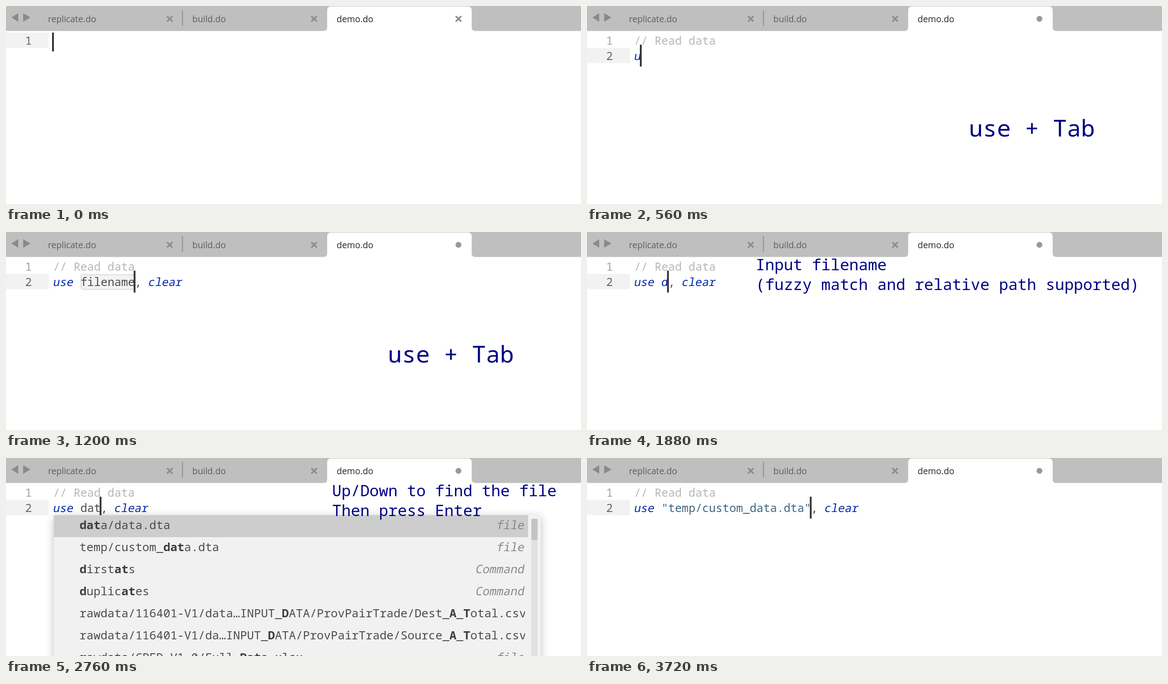
Recreate the animation shown at these times as an HTML page with a canvas. Size 1273 px wide and 440 px high, loop 4200 ms.

```html
<!DOCTYPE html>
<html lang="en">
<head>
<meta charset="utf-8">
<title>Editor file completion</title>
<style>
html, body { margin: 0; width: 100%; height: 100%; overflow: hidden; background: #fff; }
canvas { display: block; }
</style>
</head>
<body>
<canvas id="stage" width="1273" height="440"></canvas>
<script>
const ctx = document.getElementById('stage').getContext('2d');
const LOOP = 4200;
const COMMENT = '// Read data';
const MONO = '"Noto Sans Mono", monospace';
const CODE_ADVANCE = 15.05, LIST_ADVANCE = 15.45;
const CODE_X = 104.5;
const KEYWORD = '#0028ae', PLAIN = '#4c4c4c', STRING = '#3d6684', HINT = '#000085';
const ROW_TOP = 127, ROW_HEIGHT = 48.9;

// Square brackets mark the matched letters.
const SUGGESTIONS = {
  da: [
    ['[da]ta/data.dta', 'file'],
    ['temp/custom_[da]ta.dta', 'file'],
    ['[d]i[a]g', 'Function'],
    ['[d]bet[a]', 'Command'],
    ['[d]isc[a]rd', 'Command'],
    ['[d]irst[a]ts', 'Command'],
    ['[d]ispl[a]y', 'Command']
  ],
  dat: [
    ['[dat]a/data.dta', 'file'],
    ['temp/custom_[dat]a.dta', 'file'],
    ['[d]irst[at]s', 'Command'],
    ['[d]uplic[at]es', 'Command'],
    ['rawdata/116401-V1/data…INPUT_[D]ATA/ProvPairTrade/Dest_[A]_[T]otal.csv', ''],
    ['rawdata/116401-V1/da…INPUT_[D]ATA/ProvPairTrade/Source_[A]_[T]otal.csv', ''],
    ['rawdata/CPED_V1.0/Full_[Dat]a.xlsx', 'file']
  ]
};

const HINTS = {
  tab: { x: 845.5, y: 290, advance: 31, lines: ['use + Tab'] },
  name: { x: 373.5, y: 85, advance: 20.72,
    lines: ['Input filename', '(fuzzy match and relative path supported)'] },
  pick: { x: 722, y: 85, advance: 20.72,
    lines: ['Up/Down to find the file', 'Then press Enter'] }
};

function rect(x, y, w, h, color, radius = 0) {
  ctx.fillStyle = color;
  ctx.beginPath();
  ctx.roundRect(x, y, w, h, radius);
  ctx.fill();
}

function polygon(color, ...points) {
  ctx.fillStyle = color;
  ctx.beginPath();
  points.forEach(([x, y]) => ctx.lineTo(x, y));
  ctx.fill();
}

function mono(text, x, y, color, advance = CODE_ADVANCE, { italic, bold } = {}) {
  ctx.save();
  ctx.translate(x, y);
  if (italic) ctx.transform(1, 0, -0.18, 1, -0.09 * advance, 0);
  ctx.font = `${bold ? 'bold ' : ''}${advance / 0.6}px ${MONO}`;
  ctx.fillStyle = color;
  ctx.fillText(text, 0, 0);
  ctx.restore();
}

function tabLabel(text, x, color) {
  ctx.font = '19.4px "Open Sans", sans-serif';
  ctx.fillStyle = color;
  ctx.fillText(text, x, 35.5);
}

function closeMark(x) {
  ctx.strokeStyle = '#8c8c8c';
  ctx.lineWidth = 3.6;
  ctx.beginPath();
  for (const side of [-1, 1]) {
    ctx.moveTo(x - 6, 28.5 - 6 * side);
    ctx.lineTo(x + 6, 28.5 + 6 * side);
  }
  ctx.stroke();
}

function drawTabs(modified) {
  rect(0, 0, 1273, 55.5, '#bfbfbf');
  polygon('#8a8a8a', [12, 25.5], [27, 16], [27, 35]);
  polygon('#8a8a8a', [54, 25.5], [38, 16], [38, 35]);
  rect(389.3, 9, 2.6, 35, '#989898');

  ctx.fillStyle = '#fff';
  ctx.beginPath();
  ctx.moveTo(704, 55.5);
  ctx.arcTo(711, 55.5, 711, 48, 7);
  ctx.arcTo(711, 1, 720, 1, 8);
  ctx.arcTo(1031, 1, 1031, 10, 8);
  ctx.arcTo(1031, 55.5, 1038, 55.5, 7);
  ctx.lineTo(1038, 56);
  ctx.lineTo(704, 56);
  ctx.fill();

  tabLabel('replicate.do', 93, '#5c5c5c');
  tabLabel('build.do', 412.5, '#5c5c5c');
  tabLabel('demo.do', 732, '#262626');
  closeMark(362.5);
  closeMark(682);
  if (modified) rect(995.2, 22, 13, 13, '#999', 6.5);
  else closeMark(1001.7);
}

function drawCode({ line, comment, code, caret, field }) {
  rect(0, 59 + 34 * line, 95, 34, '#f2f2f2');
  for (let i = 0; i <= line; i++) {
    mono(String(i + 1), 42.3, 86 + 34 * i, i === line ? '#666' : '#a2a2a2');
  }
  mono(comment, CODE_X, 86, '#b7b7b7');
  if (field) {
    rect(165, 94, 121, 34.5, '#dcdcdc', 6);
    rect(167, 96, 117, 30.5, '#f3f3f3', 4);
  }
  let column = 0;
  for (const [text, color] of code) {
    mono(text, CODE_X + column * CODE_ADVANCE, 120, color, CODE_ADVANCE,
      { italic: color === KEYWORD });
    column += text.length;
  }
  const top = line ? 86 : 59;
  rect(102 + caret * CODE_ADVANCE, top, 4, line ? 48.5 : 42, '#333');
}

function drawPopup(rows, selected) {
  ctx.save();
  ctx.shadowColor = 'rgba(0,0,0,.25)';
  ctx.shadowBlur = 18;
  ctx.shadowOffsetY = 4;
  rect(106, ROW_TOP, 1078, 340, '#f1f1f1');
  ctx.restore();
  rect(106, ROW_TOP + selected * ROW_HEIGHT, 1050, ROW_HEIGHT, '#cdcdcd');
  rect(1163, 135, 14, 310, '#e1e1e1', 3);
  rect(1163, 135, 14, rows === SUGGESTIONS.da ? 68 : 47, '#c3c3c3', 3);

  ctx.save();
  ctx.beginPath();
  ctx.rect(106, ROW_TOP, 1043, 313);
  ctx.clip();
  rows.forEach(([label, kind], i) => {
    const y = 158.3 + i * ROW_HEIGHT;
    let column = 0;
    label.split(/[[\]]/).forEach((part, k) => {
      const bold = k % 2 === 1;
      mono(part, 162.8 + column * LIST_ADVANCE, y, bold ? '#3c3c3c' : '#4c4c4c', LIST_ADVANCE, { bold });
      column += part.length;
    });
    mono(kind, 1148 - kind.length * LIST_ADVANCE, y, '#888', LIST_ADVANCE, { italic: true });
  });
  ctx.restore();
}

function drawHint({ x, y, advance, lines }) {
  lines.forEach((text, i) => mono(text, x, y + 44 * i, HINT, advance));
}

const useCommand = (name, color) =>
  [['use ', KEYWORD], [name, color], [', ', PLAIN], ['clear', KEYWORD]];

function stateAt(t) {
  if (t < 520) {
    const typed = Math.floor(t / 40);
    return { line: 0, comment: COMMENT.slice(0, typed), code: [], caret: typed };
  }
  const state = { line: 1, comment: COMMENT, hint: HINTS.tab };
  if (t < 1200) {
    const typed = [560, 640, 720].filter(start => t >= start).length;
    return { ...state, code: [['use'.slice(0, typed), KEYWORD]], caret: typed };
  }
  if (t < 1880) {
    return { ...state, code: useCommand('filename', PLAIN), caret: 12, field: true };
  }
  if (t < 3720) {
    const name = t < 2360 ? 'd' : t < 2760 ? 'da' : 'dat';
    return {
      ...state,
      code: useCommand(name, name === 'd' ? KEYWORD : PLAIN),
      caret: 4 + name.length,
      hint: t < 2760 ? HINTS.name : HINTS.pick,
      popup: t >= 2400 && SUGGESTIONS[name],
      selected: t < 3240 ? 0 : 1
    };
  }
  return { ...state, code: useCommand('"temp/custom_data.dta"', STRING), caret: 26, hint: null };
}

function draw(now) {
  const t = now % LOOP;
  const state = stateAt(t);
  rect(0, 0, 1273, 440, '#fff');
  drawTabs(t >= 40);
  drawCode(state);
  if (state.popup) drawPopup(state.popup, state.selected);
  if (state.hint) drawHint(state.hint);
}

let start;
function tick(now) {
  start ??= now;
  draw(now - start);
  requestAnimationFrame(tick);
}
requestAnimationFrame(tick);
</script>
</body>
</html>
```
